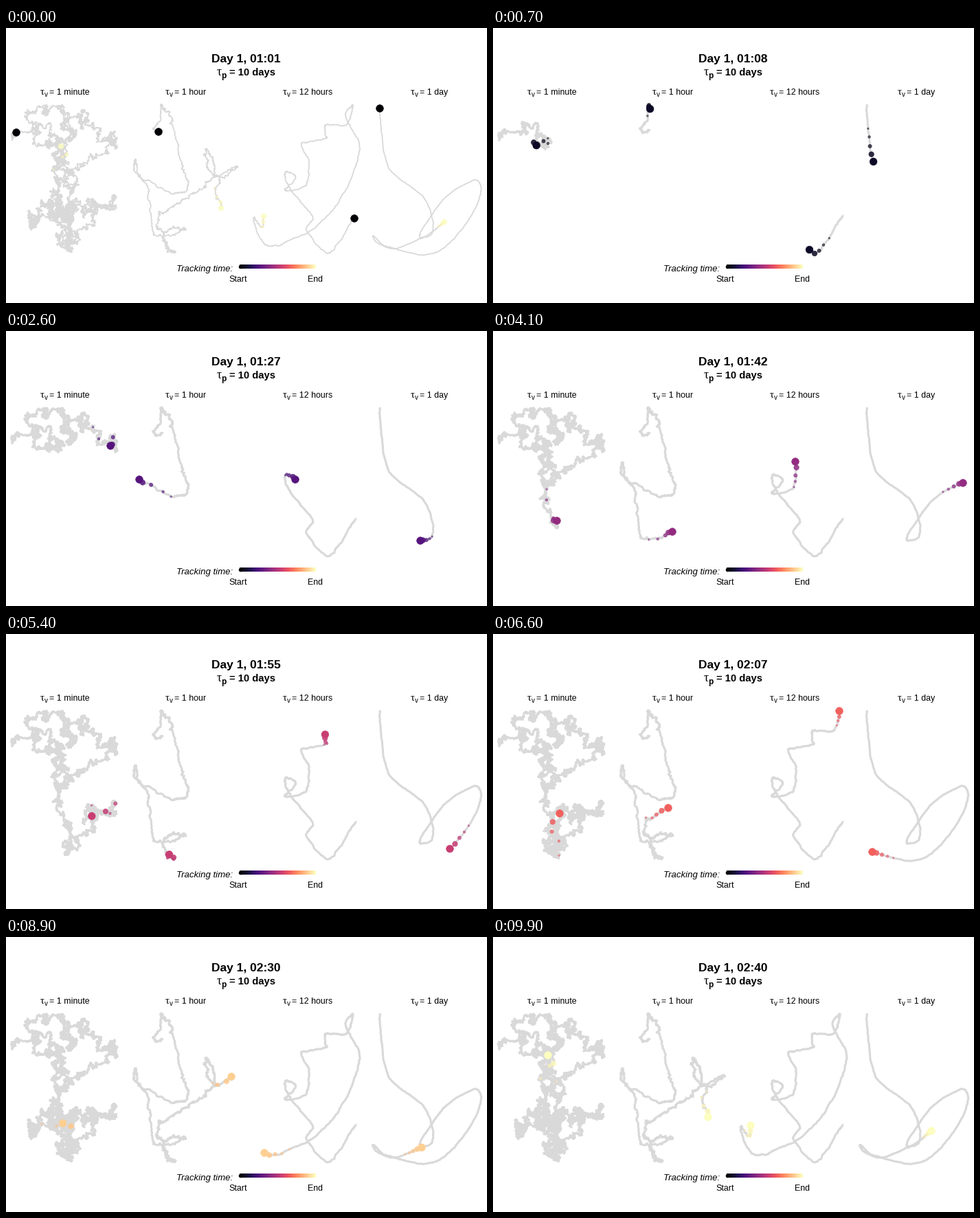
Write a matplotlib script that moves like this. It is 700 by 400 pixels and loops after 10000 ms.

```python
import numpy as np
import matplotlib.pyplot as plt
from matplotlib.animation import FuncAnimation
from matplotlib.collections import LineCollection

W, H, DPI = 700, 400, 100
PX = 72 / DPI
FRAMES, INTERVAL = 100, 100
GREY = "#d9d9d9"
MAGMA = plt.get_cmap("magma")
AGE = np.arange(4, -1, -1)
WAKE_R = 5.3 * 0.7 ** AGE
WAKE_A = 0.84 ** AGE

# Key points as (minute, x, y); the walk between them is random
MINUTE = [
    (-1, 12, 158), (0, 15, 152), (4, 80, 168), (10, 38, 124), (14, 90, 132),
    (15, 94, 162), (21, 112, 145), (26, 152, 167), (30, 96, 212),
    (41, 93, 276), (53, 145, 258), (61, 88, 312), (66, 97, 261),
    (79, 53, 258), (88, 95, 275), (99, 80, 172),
]
HOUR = [
    (-1, 229, 149), (0, 222, 151), (5, 227, 112), (12, 240, 138),
    (15, 256, 196), (19, 264, 235), (26, 194, 216), (28, 187, 194),
    (36, 218, 302), (41, 261, 292), (47, 229, 303), (52, 244, 327),
    (58, 226, 295), (66, 255, 253), (74, 304, 210), (79, 293, 177),
    (87, 308, 215), (90, 336, 202), (94, 311, 218), (99, 313, 262),
]
HALF_DAY = [
    (-1, 510, 273), (0, 507, 277), (6, 468, 328), (10, 437, 294),
    (13, 445, 272), (15, 429, 254), (24, 412, 210), (26, 421, 216),
    (31, 406, 236), (37, 438, 227), (41, 440, 190), (44, 430, 172),
    (51, 467, 159), (55, 464, 141), (61, 497, 139), (66, 504, 112),
    (69, 494, 126), (74, 515, 175), (79, 483, 255), (89, 376, 314),
    (93, 360, 277), (97, 374, 289), (99, 375, 274),
]
DAY = [
    (-1, 544, 111), (0, 544, 117), (8, 557, 204), (15, 608, 247),
    (22, 620, 299), (26, 603, 305), (37, 655, 234), (41, 684, 221),
    (45, 691, 238), (57, 624, 327), (66, 552, 317), (75, 537, 304),
    (79, 551, 318), (92, 618, 298), (99, 638, 282),
]


def reflect(v, lo, hi):
    v = lo + np.abs(v - lo)
    return hi - np.abs(hi - v)


def route(points, n, jitter, bend, seed):
    """Hermite curve through the key points plus a bridged random walk."""
    data = np.array(points)
    t, xy = data[:, 0], data[:, 1:].astype(float)
    tt = np.linspace(-1, FRAMES - 1, FRAMES * n + 1)
    k = np.clip(np.searchsorted(t, tt, "right") - 1, 0, len(t) - 2)
    h = (t[k + 1] - t[k])[:, None]
    u = (tt - t[k])[:, None] / h
    m = np.gradient(xy, t, axis=0) * bend
    ease = u * u * (3 - 2 * u)
    curve = (xy[k] * (1 - ease) + xy[k + 1] * ease
             + h * u * (1 - u) * ((1 - u) * m[k] - u * m[k + 1]))
    walk = np.random.default_rng(seed).normal(0, jitter, curve.shape).cumsum(0)
    for j in range(2):
        curve[:, j] += walk[:, j] - np.interp(tt, t, walk[(t + 1) * n, j])
    return curve


ROUTES = [
    (route(MINUTE, 100, 1.05, 0.3, 4), 100),
    (route(HOUR, 12, 0.75, 0.7, 8), 12),
    (route(HALF_DAY, 8, 0.4, 0.95, 15), 8),
    (route(DAY, 8, 0.18, 1, 16), 8),
]
cloud = ROUTES[0][0]
cloud[:, 0] = reflect(cloud[:, 0], 8, 162)
cloud[:, 1] = reflect(cloud[:, 1], 112, 328)

fig = plt.figure(figsize=(W / DPI, H / DPI), dpi=DPI, facecolor="white")
ax = fig.add_axes([0, 0, 1, 1])
ax.set_xlim(0, W)
ax.set_ylim(H, 0)
ax.axis("off")


def label(x, y, s, size, ha="left", font="Liberation Sans", **kw):
    return ax.text(x, y, s, fontsize=size * PX, ha=ha, va="baseline",
                   family=font, color="black", **kw)


def tau(x, y, sub, value, size, gap, **kw):
    label(x, y, "τ", size * 1.2, font="Liberation Serif")
    label(x + 0.45 * size, y + 0.27 * size, sub, size * 0.8, **kw)
    label(x + gap, y, "= " + value, size, **kw)


clock = label(349.5, 50, "", 17.4, ha="center", weight="bold")
tau(307, 69, "p", "10 days", 14.8, 18, weight="bold")
for x, value in ((50, "1 minute"), (232, "1 hour"),
                 (403, "12 hours"), (589, "1 day")):
    tau(x, 97, "v", value, 12.4, 13)

# Colour key
label(248, 354, "Tracking time:", 13.2, style="italic")
label(338, 369, "Start", 12.4, ha="center")
label(450.5, 369, "End", 12.4, ha="center")
ks = np.linspace(340, 451, 112)
ax.add_collection(LineCollection(
    [[(a, 347), (a + 1, 347)] for a in ks[:-1]],
    colors=MAGMA(np.linspace(0, 1, 111)), linewidths=5.6 * PX,
    antialiaseds=False))
ax.scatter([340.5], [347], s=(5.6 * PX) ** 2, color="black", linewidths=0)

trails = [ax.plot([], [], color=GREY, solid_joinstyle="round",
                  solid_capstyle="butt", zorder=2)[0] for _ in ROUTES]
dots = [ax.scatter(0 * AGE, 0 * AGE, s=(2 * WAKE_R * PX) ** 2,
                   linewidths=0.7 * PX, zorder=3) for _ in ROUTES]


def update(i):
    minutes = 61 + i
    clock.set_text(f"Day 1, {minutes // 60:02d}:{minutes % 60:02d}")
    wake = (i - AGE) % FRAMES
    colors = MAGMA(wake / (FRAMES - 1))
    colors[:, 3] = WAKE_A
    for (path, n), trail, dot in zip(ROUTES, trails, dots):
        # The opening frame shows every whole track as a thin line
        shown = path if i == 0 else path[:(i + 1) * n + 1]
        trail.set_data(shown[:, 0], shown[:, 1])
        trail.set_linewidth((1.8 if i == 0 else 3.1) * PX)
        dot.set_offsets(path[(wake + 1) * n])
        dot.set_facecolor(colors)
        dot.set_edgecolor(colors)
    return [clock, *trails, *dots]


anim = FuncAnimation(fig, update, frames=FRAMES, interval=INTERVAL,
                     init_func=lambda: update(0), repeat=True, repeat_delay=0)
plt.show()
```
